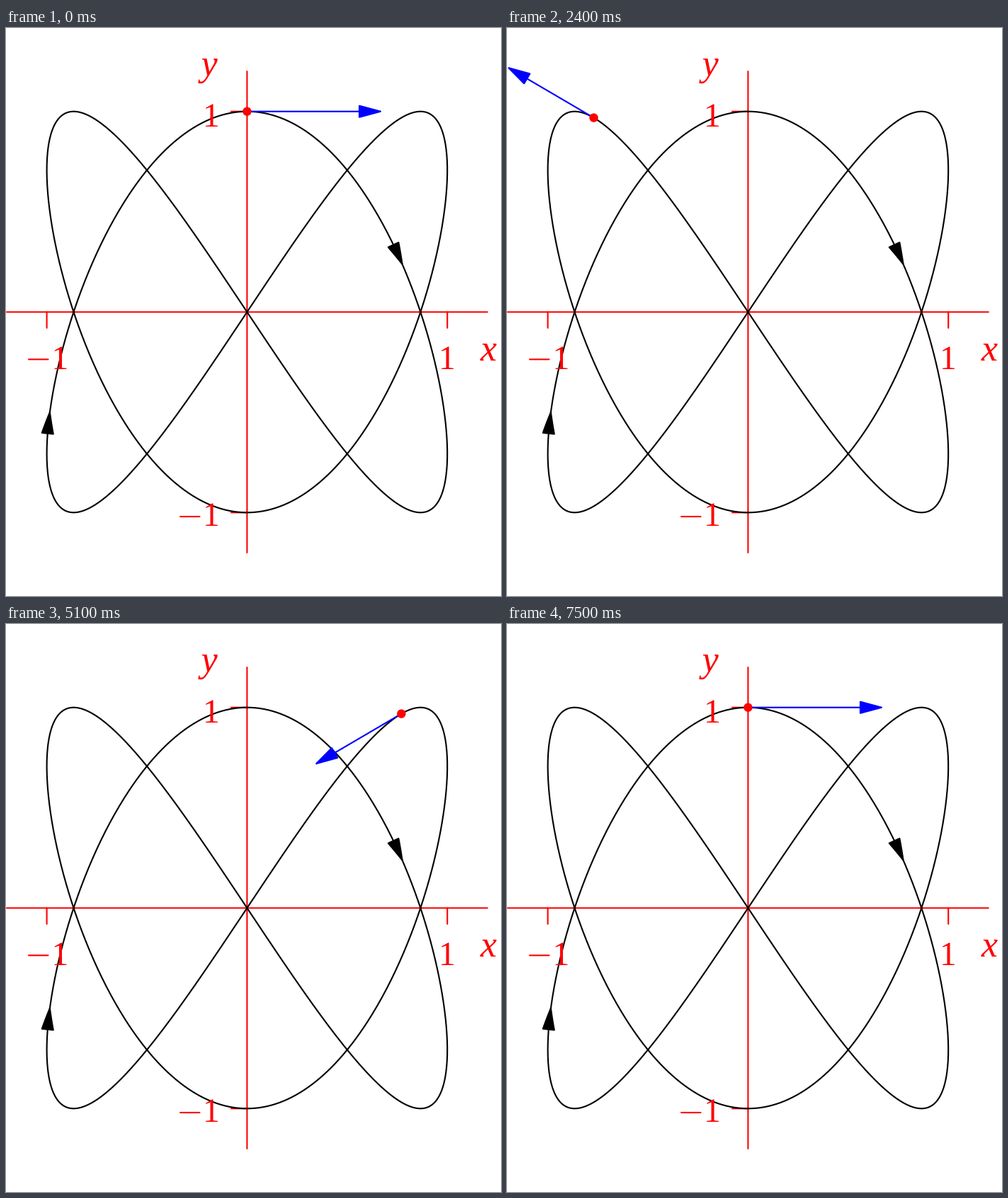
Recreate the animation shown at these times as a matplotlib script. Size 699 by 801 pixels, loop 7650 ms.

```python
import numpy as np
import matplotlib.pyplot as plt
from matplotlib.animation import FuncAnimation
from matplotlib.patches import Circle, PathPatch, Polygon
from matplotlib.path import Path
from matplotlib.textpath import TextPath

WIDTH, HEIGHT, DPI = 699, 801, 64
STEPS = 50                      # steps per full turn of the curve
CENTER = np.array([340.4, 400.5])
UNIT = 282.8
LINE = 2.1 * 72 / DPI
HEAD_LENGTH, HEAD_ANGLE = 30, np.radians(15)
EM = 47.8

fig = plt.figure(figsize=(WIDTH / DPI, HEIGHT / DPI), dpi=DPI, facecolor="white")
ax = fig.add_axes([0, 0, 1, 1])
ax.set(xlim=(0, WIDTH), ylim=(HEIGHT, 0))
ax.axis("off")


def to_pixels(x, y):
    return CENTER + UNIT * np.stack([x, -y], axis=-1)


def position(t):
    return to_pixels(np.sin(2 * t), np.cos(3 * t))


def velocity(t):
    return UNIT / 3 * np.array([2 * np.cos(2 * t), 3 * np.sin(3 * t)])


def stroke(points, color, **kw):
    return ax.plot(*np.transpose(points), color=color, lw=LINE, snap=False,
                   solid_capstyle="round", solid_joinstyle="round", **kw)[0]


def head_outline(trail):
    """Arrowhead from a trail that runs backwards from the tip."""
    steps = np.hypot(*np.diff(trail, axis=0).T)
    length = np.concatenate([[0], np.cumsum(steps)])
    s = np.linspace(0, HEAD_LENGTH / np.cos(HEAD_ANGLE), 12)
    back = np.column_stack([np.interp(s, length, trail[:, i]) for i in (0, 1)]) - trail[0]
    c, d = np.cos(HEAD_ANGLE), np.sin(HEAD_ANGLE)
    turn = np.array([[c, -d], [d, c]])
    return trail[0] + np.vstack([back @ turn, (back @ turn.T)[::-1]])


def add_head(trail, color, zorder):
    return ax.add_patch(Polygon(head_outline(trail), fc=color, ec=color, lw=LINE,
                                joinstyle="round", zorder=zorder))


def label(text, center_x, baseline, size=EM, style="normal"):
    glyph = TextPath((0, 0), text, size=size,
                     prop={"family": "Liberation Serif", "style": style})
    box = glyph.get_extents()
    shift = [center_x - (box.x0 + box.x1) / 2, baseline]
    path = Path(glyph.vertices * [1, -1] + shift, glyph.codes)
    ax.add_patch(PathPatch(path, fc="red", lw=0, zorder=6))


def minus(x, y):
    stroke([(x + 1, y), (x + 28.5, y)], "red", zorder=6)


# Axes and ticks
cx, cy = CENTER
stroke([(cx - 1.2 * UNIT, cy), (cx + 1.2 * UNIT, cy)], "red", zorder=1)
stroke([(cx, cy - 1.2 * UNIT), (cx, cy + 1.2 * UNIT)], "red", zorder=1)
for side in (-UNIT, UNIT):
    stroke([(cx + side, cy), (cx + side, cy + 22.5)], "red", zorder=1)
    stroke([(cx, cy + side), (cx - 22.5, cy + side)], "red", zorder=1)

label("1", 290.5, 139)
label("1", 290.5, 702)
label("1", 623.5, 481)
label("1", 77, 481)
minus(245, 689)
minus(31, 467.3)
label("x", 681, 469, 52, "italic")
label("y", 285, 67, 52, "italic")

# Curve with direction marks
stroke(position(np.linspace(0, 2 * np.pi, 1200)), "black", zorder=2)
for degrees in (25.4, 320):
    tip = np.radians(degrees)
    add_head(position(tip - np.linspace(0, 0.15, 60)), "black", 3)

# Moving point with its velocity
shaft = stroke([CENTER, CENTER], "blue", zorder=4)
pointer = add_head(np.array([CENTER, CENTER - [60, 0]]), "blue", 4)
dot = ax.add_patch(Circle(CENTER, 6.2, fc="red", lw=0, zorder=5))


def update(frame):
    t = 2 * np.pi * frame / STEPS
    start, arrow = position(t), velocity(t)
    tip = start + arrow
    base = tip - arrow / np.hypot(*arrow) * HEAD_LENGTH
    shaft.set_data(*np.transpose([start, base]))
    pointer.set_xy(head_outline(np.array([tip, start])))
    dot.center = start
    return shaft, pointer, dot


anim = FuncAnimation(fig, update, frames=STEPS + 1, interval=150,
                     repeat=True, repeat_delay=0, blit=False)
plt.show()
```
